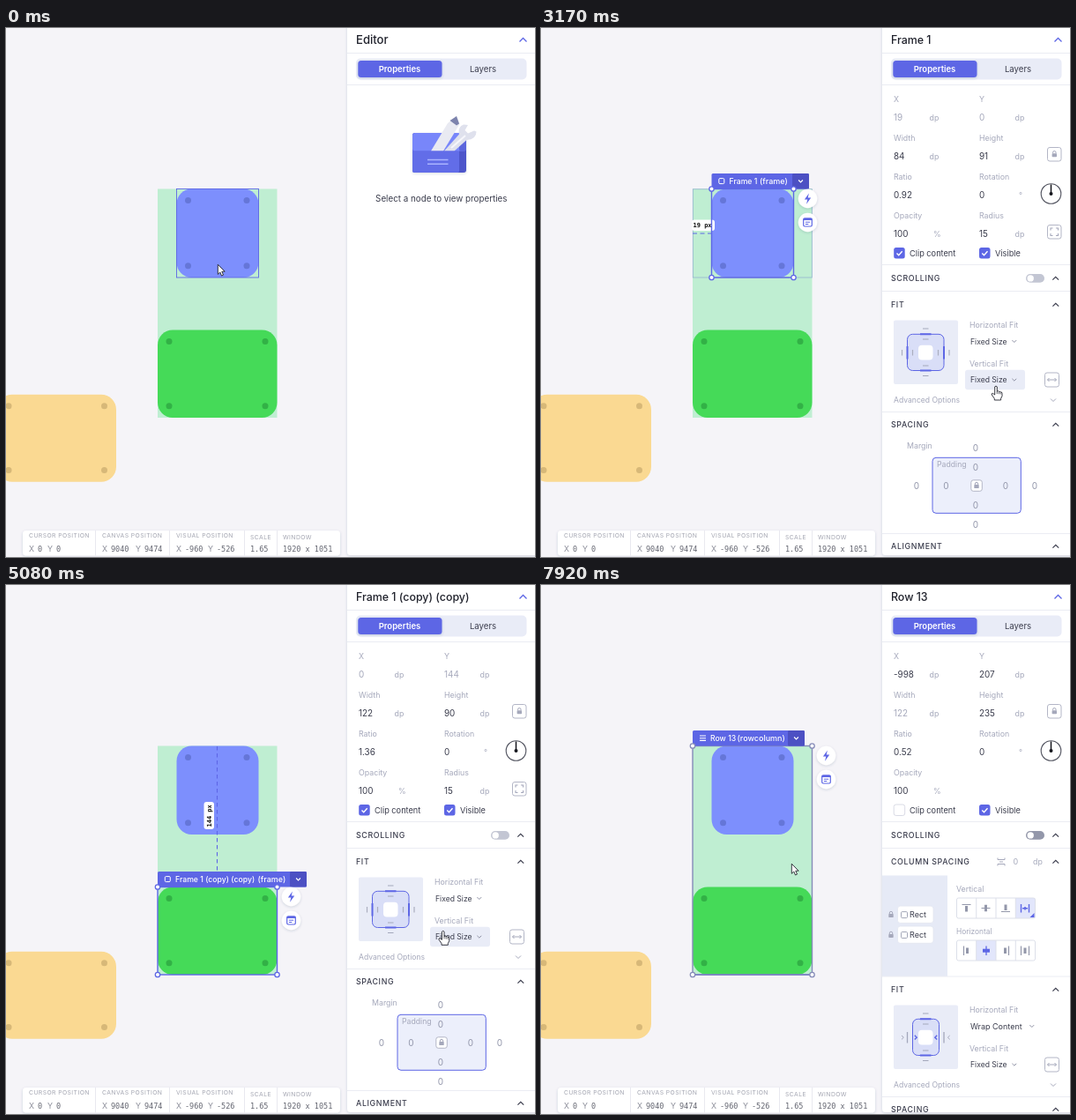
Write an HTML page that moves like this. It is 600x600 px and loops after 8000 ms.

```html
<!DOCTYPE html>
<html lang="en">
<head>
<meta charset="utf-8">
<title>Editor</title>
<style>
  html, body { margin: 0; width: 100%; height: 100%; overflow: hidden; background: #f5f4f8; }
  svg { display: block; width: 600px; height: 600px; }
  text { font-family: Inter, "Open Sans", sans-serif; white-space: pre; }
  .mono { font-family: "DejaVu Sans Mono", monospace; }
</style>
</head>
<body>
<svg id="stage" viewBox="0 0 600 600" xmlns="http://www.w3.org/2000/svg"></svg>
<script>
const BLUE = '#5d66e5', DARK = '#3b3d4d', GREY = '#a5a8bb', LINE = '#ebecf3', PALE = '#e9ecf7';

const text = (x, y, s, size = 8.8, fill = GREY, more = '') =>
  `<text x="${x}" y="${y}" font-size="${size}" fill="${fill}" ${more}>${s}</text>`;
const box = (x, y, w, h, r, fill, more = '') =>
  `<rect x="${x}" y="${y}" width="${w}" height="${h}" rx="${r}" fill="${fill}" ${more}/>`;
const line = (d, color, w = 1, more = '') =>
  `<path d="${d}" fill="none" stroke="${color}" stroke-width="${w}" ${more}/>`;
const dot = (x, y, r, fill, more = '') => `<circle cx="${x}" cy="${y}" r="${r}" fill="${fill}" ${more}/>`;
const group = (id, body, more = '') => `<g id="${id}" ${more}>${body}</g>`;
const stroke = (c, w = 1) => `stroke="${c}" stroke-width="${w}"`;
const chevron = (x, y, up, color = DARK, s = 3.4, w = 1.2) => {
  const d = up ? -s : s;
  return line(`M${x - s} ${y - d / 2}l${s} ${d}l${s} ${-d}`, color, w);
};
const rule = y => line(`M387 ${y}H600`, LINE);
const middle = 'text-anchor="middle"';

// Canvas

const areas = {
  blue: [193.5, 182.5, 93, 100.5],
  green: [172, 342.5, 135.5, 99.5],
  row: [172, 182.5, 135.5, 259.5]
};

function card([x, y, w, h], fill, spot) {
  const spots = [[13, 13], [w - 13.5, 13], [13, h - 13.2], [w - 13.5, h - 13.2]];
  return box(x, y, w, h, 17, fill) + spots.map(([a, b]) => dot(x + a, y + b, 3.5, spot)).join('');
}

function selection(name, [x, y, w, h], label, type, typeX, split, icon, edge, extra = '') {
  const top = y - 17.5, bx = x + w + 16;
  const tag = box(x, top, split + 19, 17.5, 1.5, BLUE) +
    box(x + split, top, 19, 17.5, 1.5, '#4c50c3') +
    chevron(x + split + 9.5, top + 8.7, false, '#fff', 2.4, 1.2) + icon(x, top) +
    text(x + 20, top + 12, label, 8.7, '#fff', 'font-weight="500"') +
    text(typeX, top + 12, type, 9, '#fff', 'font-weight="500"');
  const corners = [[x, y], [x + w, y], [x, y + h], [x + w, y + h]]
    .map(([a, b]) => dot(a, b, 2.7, '#fff', stroke(edge, 1.3))).join('');
  const buttons = [11, 38].map(d => dot(bx, y + d, 10.7, '#fff', 'filter="url(#soft)"')).join('') +
    `<path d="M${bx + 1.4} ${y + 5}l-5 7h3.4l-1.3 5.3 5.2-7.3h-3.5z" fill="${BLUE}"/>` +
    box(bx - 4.8, y + 33.3, 9.6, 9.2, 1.4, 'none', stroke(BLUE, 1.2)) +
    line(`M${bx - 4.8} ${y + 34.5}h9.6`, BLUE, 2) +
    line(`M${bx - 2.6} ${y + 37.7}h5.2M${bx - 2.6} ${y + 40}h3.4`, BLUE, 1);
  return group('sel-' + name, extra + box(x, y, w, h, 0, 'none', stroke(edge, 1.4)) + tag + corners + buttons);
}

const frameIcon = (x, y) => box(x + 8.3, y + 5.6, 6, 6, 1.2, 'none', stroke('#fff', 1));
const menuIcon = (x, y) => line(`M${x + 8} ${y + 6}h7m-7 2.7h7m-7 2.7h7`, '#fff', 1.1);

const gapAcross = box(172.3, 182.8, 135, 100.2, 0, 'none', stroke('#93b3cf', .8)) +
  line('M172 233H193', BLUE, 1.2, 'stroke-dasharray="5 3.5"') +
  box(171, 217.5, 26, 12.5, 3, '#fff') +
  text(172.5, 226.3, '19 px', 7, '#111', 'class="mono" font-weight="700"');
const gapDown = line('M239.5 183V325', BLUE, 1.1, 'stroke-dasharray="4.5 3.5"') +
  box(224.5, 246, 11.5, 31, 3, '#fff') +
  text(0, 0, '144 px', 7, '#111', 'class="mono" font-weight="700" transform="translate(232.8 274.5) rotate(-90)"');

function statusBar() {
  const val = (x, s) => text(x, 593.7, s, 8.5, '#62646f', 'class="mono"');
  const key = (x, s) => text(x, 593.7, s, 8.8, '#8b8d99');
  const head = (x, y, s) => text(x, y, s, 6.8, '#a3a5b1', 'letter-spacing=".42"');
  return box(19, 570, 360, 28.5, 4, '#fff', 'filter="url(#soft)"') +
    line('M101.5 570v28.5M185.5 570v28.5M270.5 570v28.5M307.5 570v28.5', '#e9e9ef') +
    head(26, 578, 'CURSOR POSITION') + head(109, 578, 'CANVAS POSITION') +
    head(193, 578, 'VISUAL POSITION') + head(277, 580, 'SCALE') + head(314, 580, 'WINDOW') +
    key(26, 'X') + val(36, '0') + key(47, 'Y') + val(57, '0') +
    key(109, 'X') + val(119, '9040') + key(147, 'Y') + val(157, '9474') +
    key(193, 'X') + val(203, '-960') + key(229, 'Y') + val(239, '-526') +
    val(277, '1.65') + val(314, '1920 x 1051');
}

// Panel

const caption = (y, s) => text(397, y, s, 8.8, DARK, 'font-weight="500" letter-spacing=".65"');
const lock = (x, y, c = GREY) => box(x - 2.7, y - .7, 5.4, 4, .7, c) +
  line(`M${x - 1.7} ${y - .5}v-1.3a1.7 1.7 0 0 1 3.4 0v1.3`, c, 1);
const tile = (x, y, s) => box(x, y, s, s, 2.5, '#fff', stroke('#b3b6c6', 1));
const check = (x, on) => box(x, 249, 12.5, 12.5, 2.5, on ? BLUE : '#fff', on ? '' : stroke('#d9dbe5')) +
  (on ? line(`M${x + 3.3} 255.4l2.2 2.3 4-4.4`, '#fff', 1.4) : '');

function fields(v, isRow) {
  const cell = (x, y, name, value, unit, dim) => text(x, y, name) +
    text(x, y + 21.2, value, 9.9, dim ? GREY : DARK) + text(x + (unit === '%' ? 45 : 40.5), y + 20.5, unit);
  return cell(400, 84, 'X', v.x, 'dp', !isRow) + cell(497, 84, 'Y', v.y, 'dp', !isRow) +
    cell(400, 128, 'Width', v.w, 'dp', isRow) + cell(497, 128, 'Height', v.h, 'dp') +
    cell(400, 172, 'Ratio', v.ratio, '') + cell(497, 172, 'Rotation', '0', '') + text(542, 193, '°') +
    cell(400, 216, 'Opacity', '100', '%') +
    (isRow ? '' : cell(497, 216, 'Radius', '15', 'dp') + tile(574.5, 223.5, 15.5) +
      line('M578 229.5v-2.5h2.5M584 227h2.5v2.5M586.500 233v2.500h-2.500M580.500 235.500h-2.500v-2.500', GREY, 1.1)) +
    tile(574.5, 135.5, 15.5) + lock(582.3, 143) +
    dot(578.5, 188, 11.3, '#fff', stroke('#50525e', 1.1)) + line('M578.5 188v-10.500', '#15161d', 1.5) +
    dot(578.5, 188, 2, '#15161d') +
    check(400.2, !isRow) + text(418, 258.6, 'Clip content', 9.2, DARK) +
    check(497, true) + text(515, 258.6, 'Visible', 9.2, DARK) +
    rule(268.5) + caption(287, 'SCROLLING') +
    box(550, 279, 21, 9.8, 4.9, isRow ? '#9397aa' : '#c3c6d3') + dot(555.2, 283.9, 3.7, '#fff') +
    chevron(583.7, 284, true) + rule(298.5);
}

function fit(wrap) {
  const x = wrap ? 421.5 : 415.5, w = wrap ? 30 : 41.5, end = x + w;
  const marks = wrap
    ? line('M415.500 362v12.500M457 362v12.500', '#a3a7bb', 1.3) +
      line('M409 366l2.300 2.200-2.300 2.200M463.700 366l-2.300 2.200 2.300 2.200', GREY) +
      line('M423.800 365.800l2.400 2.400-2.400 2.400M449.200 365.800l-2.400 2.400 2.400 2.400', BLUE, 1.4)
    : line('M409.500 365v6.500M421.500 365v6.500M450.500 365v6.500M463 365v6.500', '#abaebf', 1.2) +
      line(`M${x} 361v14.500M${end} 361v14.500`, BLUE, 2);
  const menu = (y, s) => text(487, y + 3.3, s, s === 'Fixed Size' ? 8.6 : 9, DARK) +
    chevron(s === 'Fixed Size' ? 536.8 : 556.800, y, false, '#8e91a4', 2.4, 1);
  return caption(317, 'FIT') + chevron(583.8, 314, true) +
    box(400, 331.5, 73, 72.5, 2, PALE) +
    box(x, 347.3, w, 41.2, 6, '#d9def7', stroke(BLUE, 1)) + marks +
    line('M433 341h6.500M433 353h6.500M433 383h6.500M433 394.500h6.500', '#a3a7bb', 1.2) +
    line('M430 347.300h12.500M430 388.500h12.500', BLUE, 2) +
    box(428, 359.7, 16.5, 16.8, 4, '#fff') +
    text(486, 340.2, 'Horizontal Fit') + menu(355.3, wrap ? 'Wrap Content' : 'Fixed Size') +
    text(486, 383.8, 'Vertical Fit') + menu(399, 'Fixed Size') +
    tile(571.5, 391, 16) + line('M574.500 399h10M576.500 397l-2 2 2 2M582.500 397l2 2-2 2', GREY) +
    text(400, 425.4, 'Advanced Options', 8.6) + chevron(581, 422, false, GREY, 3, 1) +
    rule(435.5) + caption(453.3, 'SPACING') + chevron(583.8, 450, true);
}

function spacing() {
  const zeros = [[493, 480], [493, 501.5], [493, 545], [493, 567], [426, 523], [459.5, 523], [527, 523], [560, 523]];
  return text(415, 477, 'Margin') + box(444, 487.3, 100.3, 63, 4, '#eceffb', stroke(BLUE, 1)) +
    text(449, 498, 'Padding', 8.7) + tile(487.8, 512.8, 12.5) + lock(494, 518.800) +
    zeros.map(([x, y]) => text(x, y, '0', 10, '#9296aa', middle)).join('') +
    rule(573.5) + caption(591, 'ALIGNMENT') + chevron(583.8, 588, true);
}

function columns() {
  const rect = y => lock(397, y) + box(404.5, y - 9.7, 40.5, 19.3, 3, '#fff', stroke('#e3e6f0', .8)) +
    box(408.5, y - 3.2, 7, 7, 1.2, '#fff', stroke('#a3a7b8', 1)) + text(418, y + 3.2, 'Rect', 9, DARK);
  const bars = (y, on) => box(471.5, y, 89, 23, 2, '#fff') + box(471.5 + on * 22.25, y, 22.25, 23, 1, '#e2e6fb') +
    box(471.5, y, 89, 23, 2, 'none', stroke('#dcdfe9')) +
    line(`M493.750 ${y}v23M516 ${y}v23M538.250 ${y}v23`, '#dcdfe9');
  const ink = '#9397aa';
  return caption(317, 'COLUMN SPACING') + line('M518 309.500v2h8v-2M518 318.500v-2h8v2M520 314h4', GREY) +
    text(535.5, 317.3, '0', 9) + text(558, 317.3, 'dp') + chevron(583.8, 314, true) +
    box(387, 329.500, 74, 114.5, 0, '#e6eaf6') + rect(373.8) + rect(396.7) +
    text(471, 347.7, 'Vertical', 8.8) + text(471, 396.2, 'Horizontal', 8.4) +
    bars(355, 3) + bars(403, 1) +
    line('M477.500 362.500h10M522 370.500h10M499.500 366.500h10', ink, 1.2) +
    line('M482.500 364v6.500M527 362.500v6.500M504.500 362.800v7.400', ink, 3) +
    line('M544.500 362v9.500M553.500 362v9.500', BLUE, 1.400) + line('M546 366.700h6M549 365v3.500', BLUE, 1.600) +
    `<path d="M559.5 372v5h-5z" fill="${BLUE}"/>` +
    line('M479.500 409.500v10.500M530.500 409.500v10.500M544.500 409.500v10.500M553.500 409.500v10.500', ink, 1.2) +
    line('M483.500 411.500v6.500M526.500 411.500v6.500M549 411.500v6.500', ink, 3) +
    line('M505 409.500v10.500', BLUE, 1.300) + line('M501 414.700h8', BLUE, 4) + rule(444);
}

const emptyPanel = group('empty',
  box(461, 119, 61, 45, 3, '#4e55ca', 'filter="url(#soft)"') +
  box(461, 119, 53, 45, 3, '#626de8') + box(461, 119, 61, 20.500, 3, '#7886fa') + box(514, 119, 8, 20.5, 2, '#5c66dc') +
  `<path d="M482 139.500L501 108l10-8 3.500 9L496 139.500z" fill="#e9eaf2"/><path d="M503.500 105l7.500-5 3 8.500-3 2z" fill="#7d83ad"/>
   <path d="M497 139.500l17-19q-2-8 5-11l5 .5-3.500 6 3.500 3.500 7-3 2.500 1q0 9-11 9.500l-14 12.500z" fill="#dfe1ed"/>
   <path d="M505 136l16-14" stroke="#f6f6fb" stroke-width="2"/>` +
  box(461, 139.500, 53, 24.500, 2, '#626de8') + line('M478 149.500h23.500M478 154.300h23.500', '#aab4ff', 1.6) +
  text(493.8, 196.6, 'Select a node to view properties', 9.8, DARK, middle));

const panel = box(387, -8, 216, 606, 4, '#fff', 'filter="url(#soft)"') +
  '<g clip-path="url(#panel)">' + rule(28.5) + rule(64.5) + chevron(586.5, 13.5, true, BLUE, 4, 1.3) +
  box(397, 34.5, 193.500, 24, 5, PALE) + box(399.3, 37, 95.2, 19, 3.5, BLUE, 'filter="url(#soft)"') +
  text(446.5, 50, 'Properties', 9.5, '#fff', middle + ' font-weight="600"') +
  text(541, 50, 'Layers', 9.6, DARK, middle) +
  text(397, 18, '', 12.5, '#20222c', 'id="title" font-weight="500"') + emptyPanel +
  group('prop-blue', fields({ x: '19', y: '0', w: '84', h: '91', ratio: '0.92' })) +
  group('prop-green', fields({ x: '0', y: '144', w: '122', h: '90', ratio: '1.36' })) +
  group('prop-row', fields({ x: '-998', y: '207', w: '122', h: '235', ratio: '0.52' }, true) + columns() +
    group('fit-row', fit(true), 'transform="translate(0 145)"')) +
  group('fit-frame', box(481, 344.5, 68, 22.5, 3, PALE, 'id="drop0"') + box(481, 387.800, 68, 22.5, 3, PALE, 'id="drop1"') +
    fit(false) + spacing()) + '</g>';

const pen = 'fill="#fff" stroke="#23242d" stroke-width=".9" stroke-linejoin="round"';
const pointer = group('arrow', `<path d="M.3 .2V11.300L2.800 9 4.500 13l2-.9L4.800 8.200H8.200z" ${pen}/>`) +
  group('hand', `<path d="M-1.300 .900Q0-.700 1.300 .900V6.200Q2.500 5 3.400 6.400 4.600 5.600 5.300 7 6.800 6.500 7 8.300V11.500L5.600 14.200V16H-1.700V14.300L-4.700 10Q-5.200 8.200-3.500 8.400L-1.300 10z" ${pen}/>
    <path d="M1.300 6v3M3.400 6.600v2.600M5.300 7.200v2.200" stroke="#23242d" stroke-width=".7"/>`);

document.getElementById('stage').innerHTML = `<defs>
  <filter id="soft" x="-20%" y="-40%" width="140%" height="190%"><feDropShadow dx="0" dy="1" stdDeviation="1.5" flood-color="#30345c" flood-opacity=".18"/></filter>
  <clipPath id="panel"><rect x="387" y="0" width="213" height="598"/></clipPath></defs>` +
  box(0, 0, 600, 600, 0, '#f5f4f8') +
  card([-10, 415.7, 135, 99], '#fad992', '#d7b878') +
  box(...areas.row, 0, '#bfeed2') + card(areas.blue, '#7d8ffd', '#6576d8') + card(areas.green, '#45da58', '#32b146') +
  box(0, 0, 0, 0, 0, 'none', `id="hover" ${stroke(BLUE, .9)}`) +
  selection('blue', areas.blue, 'Frame 1', '(frame)', 248, 91.5, frameIcon, BLUE, gapAcross) +
  selection('green', areas.green, 'Frame 1 (copy) (copy)', '(frame)', 285.5, 150, frameIcon, BLUE, gapDown) +
  selection('row', areas.row, 'Row 13', '(rowcolumn)', 222.5, 108, menuIcon, '#858bb8',
    line('M172 442H307.500', BLUE, 1.6)) +
  statusBar() + panel + group('cursor', pointer);

// Motion, counted in twelfths of a second

const path = [
  [0, 240, 268], [3, 253, 242], [12, 253, 242], [21, 543, 368], [24, 543, 368], [27, 522, 355],
  [29, 522, 355], [33, 516, 406], [38, 516, 406], [44, 218, 380], [55, 218, 380], [62, 512, 393],
  [66, 512, 393], [71, 508, 353], [73, 508, 353], [82, 297, 332], [94, 297, 332], [95, 284, 316]
];
const titles = { none: 'Editor', blue: 'Frame 1', green: 'Frame 1 (copy) (copy)', row: 'Row 13' };
const $ = id => document.getElementById(id);
const show = (id, on) => { $(id).style.display = on ? '' : 'none'; };
const inside = (x, y, [l, t, w, h]) => x >= l && x <= l + w && y >= t && y <= t + h;

function cursorAt(step) {
  const i = path.findIndex(p => p[0] > step);
  if (i < 0) return path[path.length - 1].slice(1);
  const [a, ax, ay] = path[i - 1], [b, bx, by] = path[i];
  const u = (step - a) / (b - a), e = u * u * (3 - 2 * u);
  return [ax + (bx - ax) * e, ay + (by - ay) * e];
}

function draw(ms) {
  const step = Math.floor((ms + 4) * .012);
  const picked = step < 12 ? 'none' : step < 52 ? 'blue' : step < 88 ? 'green' : 'row';
  const [x, y] = cursorAt(step);
  const frame = picked === 'blue' || picked === 'green';

  for (const name of Object.keys(areas)) {
    show('sel-' + name, name === picked);
    show('prop-' + name, name === picked);
  }
  show('empty', picked === 'none');
  show('fit-frame', frame);
  $('title').textContent = step === 12 ? '' : titles[picked];
  $('title').setAttribute('font-size', picked === 'none' ? 13.1 : 12.4);

  const drops = [344.5, 387.8].map(top => frame && inside(x, y, [481, top, 68, 22.5]));
  drops.forEach((on, i) => show('drop' + i, on));
  const over = Object.keys(areas).find(name => inside(x, y, areas[name]));
  const lit = over && over !== picked;
  show('hover', lit);
  if (lit) ['x', 'y', 'width', 'height'].forEach((k, i) => $('hover').setAttribute(k, areas[over][i]));

  const hand = drops[0] || drops[1];
  show('hand', hand);
  show('arrow', !hand);
  $('cursor').setAttribute('transform', `translate(${x} ${y})`);
}

const start = performance.now();
function tick() {
  draw((performance.now() - start) % 8000);
  requestAnimationFrame(tick);
}
tick();
</script>
</body>
</html>
```
